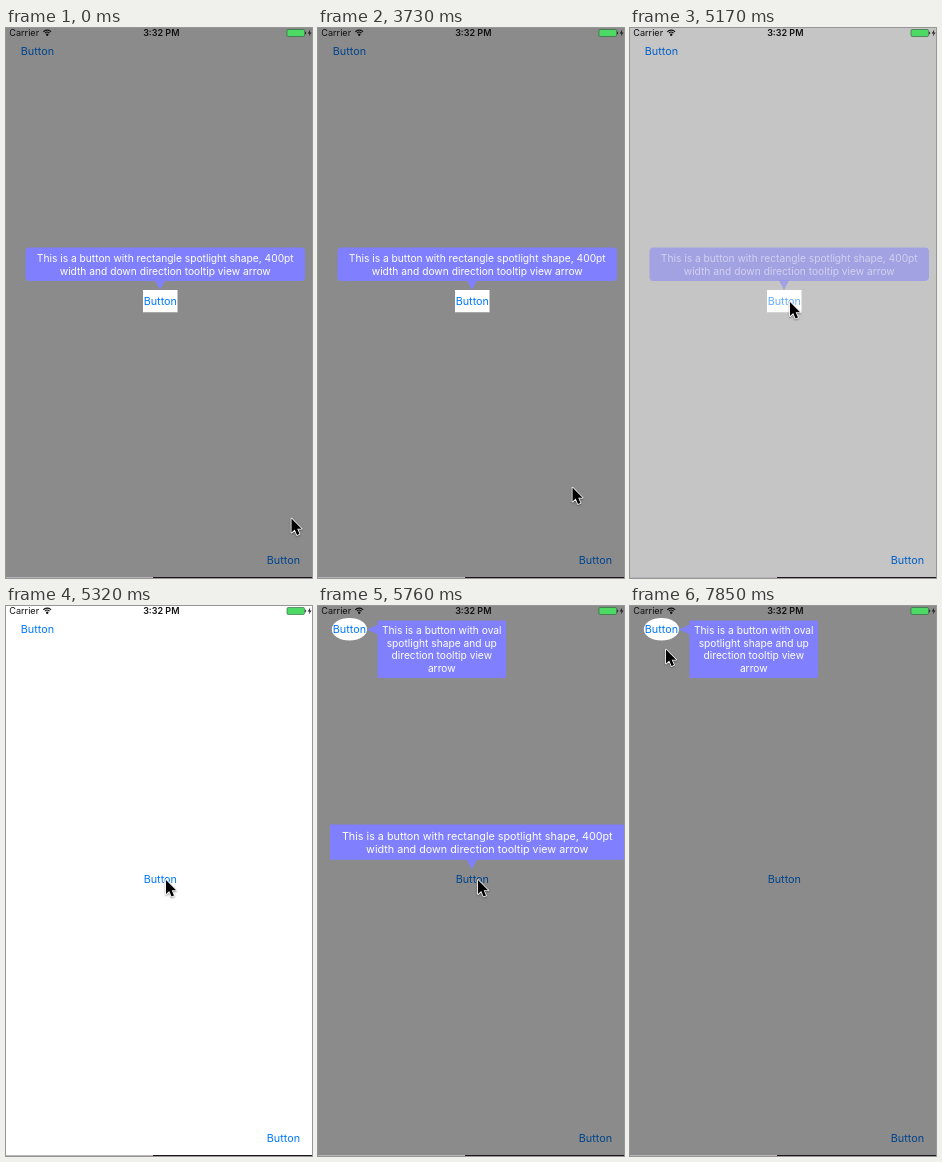
These frames come from a looping animation (306 by 550 pixels, 7.99 s). An HTML page with a canvas:

```html
<!DOCTYPE html>
<html lang="en">
<head>
<meta charset="utf-8">
<title>Spotlight tooltips</title>
<style>
html, body { margin: 0; width: 100%; height: 100%; overflow: hidden; background: #fff; }
canvas { display: block; width: 306px; height: 550px; }
</style>
</head>
<body>
<canvas id="stage"></canvas>
<script>
const W = 306, H = 550, LOOP = 7990;
const FONT = 'Inter, Roboto, "Liberation Sans", sans-serif';
const canvas = document.getElementById('stage');
const ctx = canvas.getContext('2d');
const ratio = window.devicePixelRatio || 1;
canvas.width = W * ratio;
canvas.height = H * ratio;

// Pointer moves: start, end, number of steps, destination
const START = [285, 490];
const MOVES = [
  [440, 1340, 7, 262, 457],
  [1640, 1790, 2, 256, 459],
  [3730, 3730, 1, 254, 459],
  [3880, 4760, 7, 159.5, 273.5],
  [6960, 7850, 7, 35.5, 43]
];

// The switch from one spotlight to the next, one entry per step
const SWITCH = { start: 4880, end: 5910, steps: 8 };
const OVERLAY = [1, 1, 0.5, 0, 0.35, 0.75, 1, 1];
const PRESSED = [0.2, 0.2, 0.6, 1, 1, 1, 1, 1];
const LEAVING_SCALE = [1, 1, 1, 1, 1, 1, 1.054, 0.45];

const BUTTONS = [[31.4, 23.4], [154.3, 273.2], [277.4, 532.2]];

const RECT_TIP = {
  x: 19.5, y: 219.5, w: 279.5, h: 33.5, radius: 4,
  arrow: [[149, 252.5], [154, 262], [159, 252.5]],
  textY: 230.5,
  lines: ['This is a button with rectangle spotlight shape, 400pt',
          'width and down direction tooltip view arrow']
};
const OVAL_TIP = {
  x: 59.5, y: 14.5, w: 128.5, h: 57.5, radius: 1,
  arrow: [[60, 18.5], [49, 23.5], [60, 28.5]],
  textY: 24.5,
  lines: ['This is a button with oval', 'spotlight shape and up',
          'direction tooltip view', 'arrow']
};

function stepAt(t, start, end, steps) {
  if (t < start) return 0;
  if (steps === 1) return 1;
  const span = (end - start) / (steps - 1);
  return Math.min(steps, Math.floor((t - start) / span + 0.08) + 1);
}

const ease = p => p * p * (3 - 2 * p);

function pointerAt(t) {
  let [x, y] = START;
  for (const [start, end, steps, toX, toY] of MOVES) {
    const p = ease(stepAt(t, start, end, steps) / steps);
    x += (toX - x) * p;
    y += (toY - y) * p;
  }
  return [x, y];
}

function text(str, x, y, size, color, align = 'center', weight = 400) {
  ctx.font = `${weight} ${size}px ${FONT}`;
  ctx.textAlign = align;
  ctx.textBaseline = 'alphabetic';
  ctx.fillStyle = color;
  ctx.fillText(str, x, y + size * 0.36);
}

function polygon(points) {
  ctx.beginPath();
  points.forEach(([x, y]) => ctx.lineTo(x, y));
  ctx.closePath();
}

function faded(alpha, draw) {
  if (alpha <= 0) return;
  ctx.save();
  ctx.globalAlpha = alpha;
  draw();
  ctx.restore();
}

function drawPage(centerAlpha) {
  ctx.fillStyle = '#fff';
  ctx.fillRect(0, 0, W, H);
  BUTTONS.forEach(([x, y], i) => {
    faded(i === 1 ? centerAlpha : 1, () => text('Button', x, y, 10.8, '#007aff'));
  });
}

function drawDim(oval) {
  ctx.beginPath();
  ctx.rect(0, 0, W, H);
  if (oval) {
    ctx.moveTo(49, 23.3);
    ctx.ellipse(31.4, 23.3, 17.6, 11.3, 0, 0, Math.PI * 2);
  } else {
    ctx.rect(137, 262, 34.5, 22.3);
  }
  ctx.fillStyle = 'rgba(0, 0, 0, 0.455)';
  ctx.fill('evenodd');
}

function drawTip(tip, scale = 1) {
  const cx = tip.x + tip.w / 2;
  const cy = 238;
  ctx.translate(cx, cy);
  ctx.scale(scale, scale);
  ctx.translate(-cx, -cy);
  ctx.fillStyle = '#8080ff';
  ctx.beginPath();
  ctx.roundRect(tip.x, tip.y, tip.w, tip.h, scale > 1 ? 0 : tip.radius);
  ctx.fill();
  polygon(tip.arrow);
  ctx.fill();
  tip.lines.forEach((line, i) => text(line, cx, tip.textY + i * 12.5, 10.22, '#fff'));
}

function drawStatus() {
  text('Carrier', 3.3, 5, 9.1, '#111', 'left');
  text('3:32 PM', 155.3, 5, 9, '#111', 'center', 600);

  ctx.strokeStyle = '#111';
  ctx.lineWidth = 1.1;
  for (const r of [3.1, 5.2]) {
    ctx.beginPath();
    ctx.arc(41.2, 7.3, r, -Math.PI * 0.77, -Math.PI * 0.23);
    ctx.stroke();
  }
  ctx.fillStyle = '#111';
  ctx.beginPath();
  ctx.arc(41.2, 6.8, 1.2, 0, Math.PI * 2);
  ctx.fill();

  ctx.beginPath();
  ctx.roundRect(281, 1.5, 17.5, 7, 1.2);
  ctx.fillStyle = '#4cd964';
  ctx.fill();
  ctx.strokeStyle = '#2d5c36';
  ctx.lineWidth = 0.6;
  ctx.stroke();
  ctx.fillStyle = '#222';
  ctx.fillRect(299.2, 3.8, 0.9, 2.4);
  polygon([[304.3, 1.5], [301.7, 5.4], [303.5, 5.4], [302.8, 8.6], [305.6, 4.4], [303.8, 4.4]]);
  ctx.fill();
}

function drawEdge() {
  ctx.fillStyle = '#b9b4b8';
  ctx.fillRect(0, 549, 147, 1);
  ctx.fillStyle = '#20161d';
  ctx.fillRect(147, 549, W - 147, 1);
}

function drawPointer(x, y) {
  ctx.save();
  ctx.translate(x, y);
  polygon([[0.5, 0.5], [0.5, 14.6], [3.7, 11.6], [6, 17], [8.5, 16], [6.2, 10.7], [10.6, 10.7]]);
  ctx.shadowColor = 'rgba(0, 0, 0, 0.4)';
  ctx.shadowBlur = 2 * ratio;
  ctx.shadowOffsetY = ratio;
  ctx.lineJoin = 'round';
  ctx.lineWidth = 1.6;
  ctx.strokeStyle = '#fff';
  ctx.stroke();
  ctx.shadowColor = 'transparent';
  ctx.fillStyle = '#000';
  ctx.fill();
  ctx.restore();
}

function render(t) {
  const step = stepAt(t, SWITCH.start, SWITCH.end, SWITCH.steps);
  const i = Math.max(0, step - 1);
  const switched = step > 4;
  const overlay = OVERLAY[i];
  const last = step === SWITCH.steps;
  const leaving = t >= 6055 ? 0 : last ? 0.45 : overlay;

  ctx.setTransform(ratio, 0, 0, ratio, 0, 0);
  drawPage(step ? PRESSED[i] : 1);
  faded(overlay, () => drawDim(switched));
  faded(leaving, () => drawTip(RECT_TIP, LEAVING_SCALE[i]));
  if (switched) faded(overlay, () => drawTip(OVAL_TIP));
  drawStatus();
  drawEdge();
  drawPointer(...pointerAt(t));
}

let begin;
function tick(now) {
  begin ??= now;
  render((now - begin) % LOOP);
  requestAnimationFrame(tick);
}
render(0);
requestAnimationFrame(tick);
</script>
</body>
</html>
```
